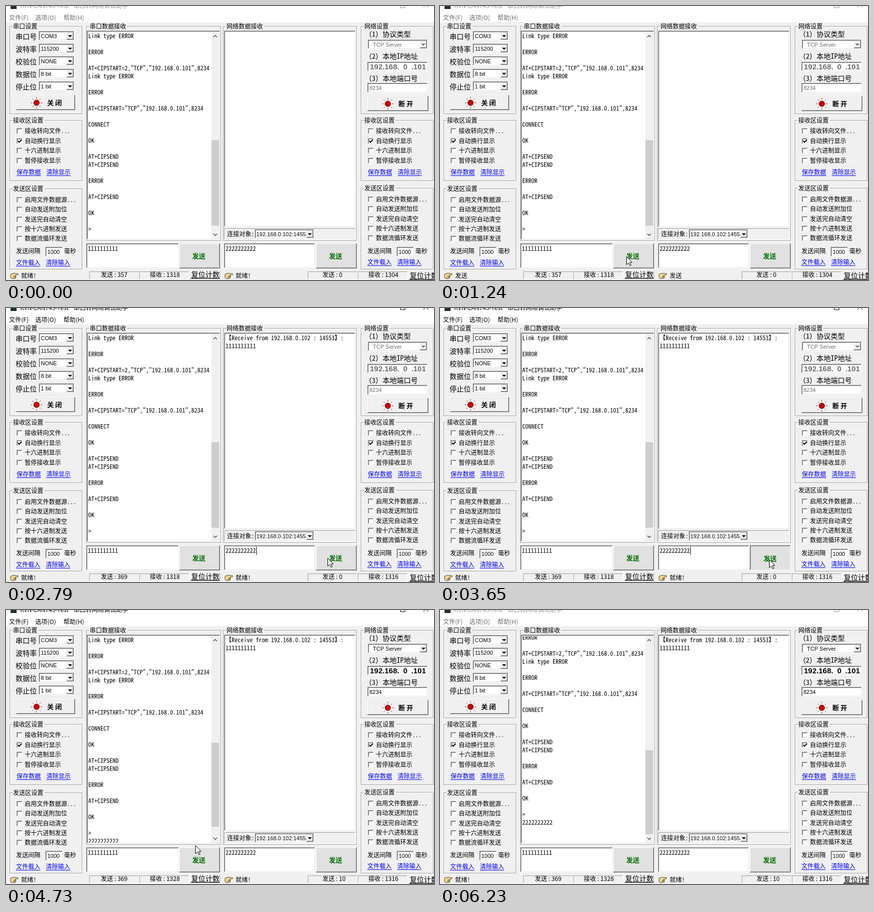
Recreate the animation shown at these times as an HTML page with a canvas. Size 848 by 545 pixels, loop 6.4 s.

```html
<!DOCTYPE html>
<html lang="zh">
<head>
<meta charset="utf-8">
<style>
html, body { margin: 0; width: 100%; height: 100%; overflow: hidden; background: #f0f0f0; }
canvas { display: block; }
</style>
</head>
<body>
<canvas id="stage" width="848" height="545"></canvas>
<script>
const ctx = document.getElementById('stage').getContext('2d');
const LOOP = 6400;
const FACE = '#f0f0f0';
const CJK = '"Noto Sans CJK SC", "Noto Sans CJK", sans-serif';
const MONO_CJK = '"Noto Sans Mono CJK SC", "Noto Sans CJK SC", monospace';
const MONO = '12px ' + MONO_CJK;
const BIG = '14px ' + MONO_CJK;
const UI = '12px ' + CJK;
const ARIAL = '11px "Liberation Sans", sans-serif';

// Cursor legs: start, end, number of steps, points on the way
const LEGS = [
  [140, 750, 9, [[673, 526], [590, 505], [500, 496], [420, 488], [374, 500]]],
  [830, 1240, 6, [[371, 499], [363, 499], [369, 498]]],
  [1540, 1540, 1, [[370, 498]]],
  [2080, 2720, 9, [[371, 498], [425, 491], [520, 480], [590, 484], [622, 493]]],
  [2790, 2950, 3, [[637, 497], [645, 499], [652, 500]]],
  [4210, 4820, 9, [[605, 494], [534, 488], [460, 480], [375, 468], [300, 458]]],
  [4900, 5530, 9, [[291, 457], [440, 490], [635, 490], [560, 480], [472, 462]]]
];

const LOG = {
  60: 'Link type ERROR', 92: 'ERROR', 124: 'AT+CIPSTART=2,"TCP","192.168.0.101",8234',
  140: 'Link type ERROR', 172: 'ERROR', 204: 'AT+CIPSTART="TCP","192.168.0.101",8234',
  236: 'CONNECT', 268: 'OK', 300: 'AT+CIPSEND', 316: 'AT+CIPSEND',
  348: 'ERROR', 380: 'AT+CIPSEND', 412: 'OK', 444: '>'
};

const between = (t, a, b) => t >= a && t < b;
const inside = ([x, y], l, t, r, b) => x >= l && x <= r && y >= t && y <= b;

function cursorAt(t) {
  if (t < 140 || t >= 5610) return null;
  const [start, end, n, pts] = LEGS.filter(leg => t >= leg[0]).pop();
  if (n === 1) return pts[0];
  const step = Math.min(n - 1, Math.floor((t - start) / (end - start) * (n - 1) + 0.15));
  const u = step / (n - 1) * (pts.length - 1);
  const i = Math.min(pts.length - 2, Math.floor(u));
  return [0, 1].map(k => Math.round(pts[i][k] + (pts[i + 1][k] - pts[i][k]) * (u - i)));
}

function box(l, t, r, b, color) {
  ctx.fillStyle = color;
  ctx.fillRect(l, t, r - l, b - t);
}

// Text centred vertically on cy
function text(s, x, cy, font = MONO, color = '#000') {
  ctx.font = font;
  ctx.fillStyle = color;
  ctx.fillText(s, x, cy + 4);
}

function bevel(l, t, r, b, light, dark) {
  box(l, t, r, t + 1, light);
  box(l, t, l + 1, b, light);
  box(l, b - 1, r, b, dark);
  box(r - 1, t, r, b, dark);
}

function sunken(l, t, r, b) {
  box(l, t, r, b, '#fff');
  bevel(l, t, r, b, '#a0a0a0', '#fff');
  bevel(l + 1, t + 1, r - 1, b - 1, '#696969', '#e3e3e3');
}

function raised(l, t, r, b, down, fill = FACE) {
  box(l, t, r, b, fill);
  if (down) {
    bevel(l, t, r, b, '#696969', '#fff');
    bevel(l + 1, t + 1, r - 1, b - 1, '#a0a0a0', '#e3e3e3');
  } else {
    bevel(l, t, r, b, '#fff', '#696969');
    bevel(l + 1, t + 1, r - 1, b - 1, '#e3e3e3', '#a0a0a0');
  }
}

function poly(pts, fill, stroke) {
  ctx.beginPath();
  pts.forEach(([x, y]) => ctx.lineTo(x, y));
  ctx.closePath();
  if (fill) { ctx.fillStyle = fill; ctx.fill(); }
  if (stroke) { ctx.strokeStyle = stroke; ctx.lineWidth = 1; ctx.stroke(); }
}

function line(pts, color, width = 1) {
  ctx.beginPath();
  pts.forEach(([x, y]) => ctx.lineTo(x, y));
  ctx.strokeStyle = color;
  ctx.lineWidth = width;
  ctx.stroke();
}

function group(l, t, r, b, title) {
  ctx.lineWidth = 1;
  ctx.strokeStyle = '#fff';
  ctx.strokeRect(l + 1.5, t + 0.5, r - l - 1, b - t);
  ctx.strokeStyle = '#a0a0a0';
  ctx.strokeRect(l + 0.5, t - 0.5, r - l - 1, b - t);
  box(l + 6, t - 2, l + 9 + title.length * 12, t + 2, FACE);
  text(title, l + 7, t);
}

function combo(l, t, r, b, s, indent, color = '#000') {
  sunken(l, t, r, b);
  ctx.save();
  ctx.beginPath();
  ctx.rect(l, t, r - l - 16, b - t);
  ctx.clip();
  const cy = Math.ceil((t + b) / 2);
  text(s, l + indent, cy, ARIAL, color);
  ctx.restore();
  raised(r - 16, t + 2, r - 2, b - 2);
  poly([[r - 13, cy - 2], [r - 5, cy - 2], [r - 9, cy + 2]], color);
}

function check(x, cy, label, on) {
  sunken(x, cy - 6, x + 12, cy + 6);
  if (on) line([[x + 3, cy - 1], [x + 5, cy + 2], [x + 10, cy - 3]], '#000', 2);
  text(label, x + 16, cy);
}

function link(s, x, cy) {
  text(s, x, cy, MONO, '#00f');
  box(x, cy + 6, x + s.length * 12, cy + 7, '#00f');
}

function lampButton(l, t, r, b, s) {
  raised(l, t, r, b);
  const x = l + 40.5, y = t + 15.5;
  for (let i = 0; i < 8; i++) {
    const c = Math.cos(i * Math.PI / 4), d = Math.sin(i * Math.PI / 4);
    line([[x + 8.5 * c, y + 8.5 * d], [x + 11.5 * c, y + 11.5 * d]], '#d02020');
  }
  ctx.beginPath();
  ctx.arc(x, y, 5.5, 0, Math.PI * 2);
  ctx.fillStyle = '#d00000';
  ctx.fill();
  ctx.strokeStyle = '#400000';
  ctx.stroke();
  ctx.letterSpacing = '3px';
  text(s, x + 21, y + 0.5, 'bold 13px ' + CJK);
  ctx.letterSpacing = '0px';
}

function sendButton(l, r, down) {
  raised(l, 472, r, 522, down, '#e1e1e1');
  const d = down ? 1 : 0;
  text('发送', l + 26 + d, 498 + d, 'bold 13px ' + CJK, '#007000');
}

function hand(x) {
  poly([[x, 533.5], [x + 6, 531.5], [x + 15, 532.5], [x + 15, 534.5], [x + 9, 535.5],
    [x + 11, 537.5], [x + 10, 541.5], [x + 4, 542.5], [x, 540.5]], '#f0d890', '#55482a');
  line([[x + 6, 537.5], [x + 10, 537.5]], '#55482a');
  line([[x + 5, 539.5], [x + 10, 539.5]], '#55482a');
}

function statusBar(x, hint, panel, sent, got, reset) {
  hand(x);
  text(hint, x + 21, 537);
  bevel(panel, 528, panel + 99, 544, '#a0a0a0', '#fff');
  bevel(panel + 99, 528, panel + 198, 544, '#a0a0a0', '#fff');
  text('发送 : ' + sent, sent < 100 ? panel + 29 : panel + 23, 535, UI);
  text('接收 : ' + got, panel + 120, 535, UI);
  const cy = reset < 500 ? 535 : 537;
  bevel(reset - 3, cy - 8, reset + 57, cy + 8, '#fff', '#a0a0a0');
  text('复位计数', reset, cy, BIG);
  box(reset, cy + 6, reset + 56, cy + 7, '#000');
}

function sideGroups(dx, dy) {
  const x = 21 + dx;
  group(7 + dx, 228, 151 + dx, 348, '接收区设置');
  ['接收转向文件...', '自动换行显示', '十六进制显示', '暂停接收显示']
    .forEach((s, i) => check(x, Math.round(249 + i * 19.6), s, i === 1));
  link('保存数据', x, 331);
  link('清除显示', x + 59, 331);
  group(7 + dx, 364 + dy, 151 + dx, 524, '发送区设置');
  ['启用文件数据源...', '自动发送附加位', '发送完自动清空', '按十六进制发送', '数据流循环发送']
    .forEach((s, i) => check(x, Math.round(386 + i * 19.3) + dy, s));
  text('发送间隔', x - 1, 488);
  sunken(78 + dx, 479, 113 + dx, 499);
  text('1000', 82 + dx, 489, ARIAL);
  text('毫秒', 115 + dx, 488);
  link('文件载入', x - 1, 511 + dy);
  link('清除输入', x + 58, 511 + dy);
}

function titleBar(active) {
  const ink = active ? '#000' : '#999';
  box(0, 0, 848, 32, '#fff');
  box(9, 0, 21, 6, '#203030');
  text('KVN-LAN745-Test', 28, 0, UI, ink);
  text('串口转网络调试助手', 134, 0, UI, ink);
  line([[781.5, 0], [781.5, 3.5], [790.5, 3.5], [790.5, 0]], ink);
  line([[830, 0], [827, 3]], ink);
  line([[834, 0], [837, 3]], ink);
  const menu = active ? '#000' : '#6d6d6d';
  text('文件(F)', 6, 24, UI, menu);
  text('选项(O)', 58, 24, UI, menu);
  text('帮助(H)', 114, 24, UI, menu);
}

function serialPanel() {
  group(7, 41, 151, 215, '串口设置');
  [['串口号', 'COM3'], ['波特率', '115200'], ['校验位', 'NONE'], ['数据位', '8 bit'], ['停止位', '1 bit']]
    .forEach(([label, value], i) => {
      text(label, 19, 62 + i * 25, BIG);
      combo(65, 50 + i * 25, 136, 69 + i * 25, value, 4);
    });
  lampButton(20, 177, 137, 207, '关闭');
}

function netPanel(open) {
  const ink = open ? '#000' : '#6d6d6d';
  group(703, 41, 847, 215, '网络设置');
  ['（1）协议类型', '（2）本地IP地址', '（3）本地端口号']
    .forEach((s, i) => text(s, 711, 57 + i * 44, BIG));
  combo(717, 67, 836, 86, 'TCP Server', 10, ink);
  sunken(716, 111, 836, 130);
  [['192', 721], ['.', 746], ['168', 750], ['.', 775], ['0', 787], ['.', 803], ['101', 807]]
    .forEach(([s, x]) => text(s, x, 122, 'bold 15px "Liberation Sans", sans-serif', ink));
  sunken(716, 153, 836, 173);
  text('8234', 720, 163, ARIAL, ink);
  lampButton(716, 179, 837, 209, '断开');
}

function serialLog(t) {
  const arrived = t >= 4030;
  const scroll = t >= 4900 ? 37 : t >= 4820 ? 32 : t >= 4740 ? 16 : 0;
  group(159, 41, 426, 467, '串口数据接收');
  sunken(160, 49, 425, 465);
  ctx.save();
  ctx.beginPath();
  ctx.rect(162, 52, 244, 411);
  ctx.clip();
  for (const y in LOG) text(LOG[y], 163, +y - scroll);
  if (arrived) text('2222222222', 163, 460 - scroll);
  ctx.restore();
  box(407, 51, 423, 463, FACE);
  const top = arrived ? 264 + Math.round(scroll * 15 / 37) : 267;
  box(407, top, 422, top + (arrived ? 167 : 170), '#cdcdcd');
  line([[411, 62], [414.5, 58.5], [418, 62]], '#505050', 1.5);
  line([[411, 453], [414.5, 456.5], [418, 453]], '#505050', 1.5);
}

function netLog(t) {
  group(430, 41, 695, 467, '网络数据接收');
  sunken(432, 49, 693, 440);
  if (t >= 1770) {
    text('【', 435, 60);
    text('Receive from 192.168.0.102 : 14553', 447, 60);
    text('】:', 651, 60);
    text('1111111111', 435, 76);
  }
  bevel(432, 442, 693, 465, '#a0a0a0', '#fff');
  text('连接对象:', 438, 454);
  combo(493, 444, 611, 463, '192.168.0.102:14553', 3);
}

function drawCursor(p, beam) {
  const [x, y] = p;
  if (beam) {
    box(x, y - 7, x + 1, y + 8, '#000');
    box(x - 3, y - 7, x + 4, y - 6, '#000');
    box(x - 3, y + 8, x + 4, y + 9, '#000');
    return;
  }
  poly([[0, 0], [0, 16], [4, 12.5], [6.5, 18], [9, 17], [6.5, 11.5], [11, 11.5]]
    .map(([a, b]) => [x + a + 0.5, y + b + 0.5]), '#fff', '#000');
}

function draw(t) {
  const p = cursorAt(t);
  const onEdit = p && (inside(p, 159, 472, 342, 521) || inside(p, 433, 472, 613, 521));
  const onLog = p && (inside(p, 161, 50, 406, 465) || inside(p, 432, 50, 692, 440));
  const onSend = p && inside(p, 344, 472, 425, 521);
  const hint = onEdit ? '在此输入发送的内容' : onSend ? '发送' : '就绪!';
  const leftHint = onSend && between(t, 1850, 2700) ? '成功发送 1111111111' : hint;
  const rightHint = between(t, 4030, 4210) ? '成功发送 2222222222' : hint;

  box(0, 0, 848, 545, FACE);
  titleBar(between(t, 1540, 6230));
  serialPanel();
  netPanel(t >= 4030);
  sideGroups(0, 0);
  sideGroups(696, -1);
  serialLog(t);
  netLog(t);

  sunken(159, 472, 343, 522);
  text('1111111111', 162, 483);
  sunken(432, 472, 613, 522);
  text('2222222222', 435, 483);
  if (between(t, 2560, 3110) || between(t, 3650, 4030)) box(496, 475, 497, 491, '#000');
  sendButton(343, 424, between(t, 1540, 1770));
  sendButton(614, 695, between(t, 3480, 4030));

  box(0, 525, 848, 545, FACE);
  statusBar(9, leftHint, 165, t >= 1770 ? 369 : 357, t >= 4030 ? 1328 : 1318, 367);
  statusBar(434, rightHint, 598, t >= 4030 ? 10 : 0, t >= 1850 ? 1316 : 1304, 800);
  if (p) drawCursor(p, onEdit || onLog);
}

const begin = performance.now();
function tick() {
  draw((performance.now() - begin) % LOOP);
  requestAnimationFrame(tick);
}
tick();
</script>
</body>
</html>
```
